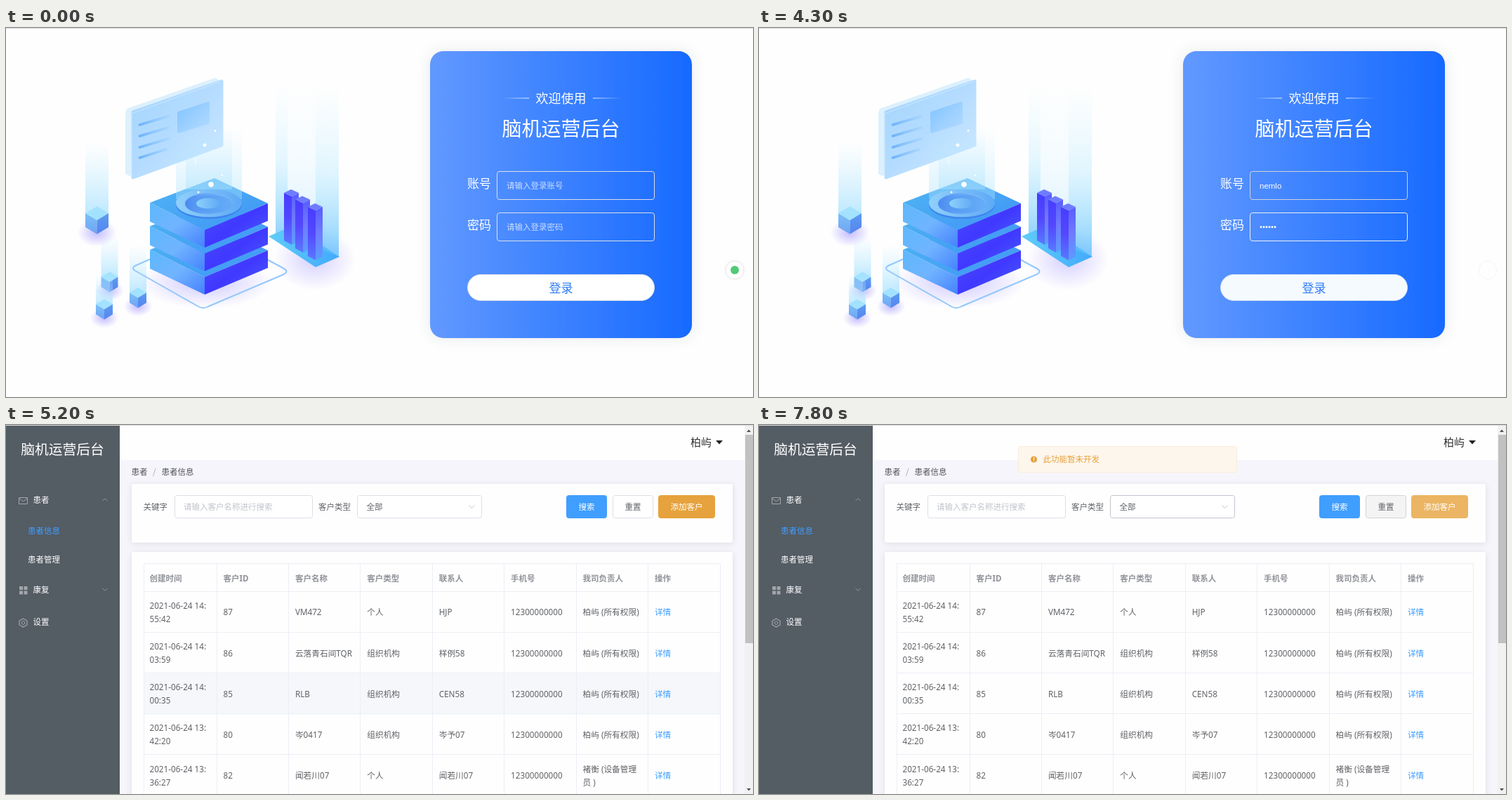
Write an HTML page that moves like this. It is 1064 px wide and 526 px high and loops after 8000 ms.

```html
<!DOCTYPE html>
<html lang="zh">
<head>
<meta charset="utf-8">
<title>后台登录</title>
<style>
  html, body { margin: 0; width: 100%; height: 100%; overflow: hidden; background: #fefefe; }
  svg { display: block; width: 100%; height: 100%; }
  text { font-family: "Noto Sans", "Noto Sans CJK SC", "Noto Sans CJK", sans-serif; white-space: pre; }
  .cjk { font-family: "Noto Sans CJK SC", "Noto Sans CJK", sans-serif; }
  .field { font-family: "Liberation Sans", Arial, sans-serif; }
</style>
</head>
<body>
<svg id="stage" viewBox="0 0 1064 526" xmlns="http://www.w3.org/2000/svg"></svg>
<script>
const LOOP = 8000;
const SIZE = 11.5;
const GREY = '#606266', LINE = '#dcdfe6', HOVER = '#c0c4cc', BLUE = '#409eff', AMBER = '#e6a23c';

// ---------- drawing helpers ----------
const rect = (x, y, w, h, fill, more = '') =>
  `<rect x="${x}" y="${y}" width="${w}" height="${h}" fill="${fill}" ${more}/>`;
const poly = (points, fill, more = '') => `<polygon points="${points}" fill="${fill}" ${more}/>`;
const path = (d, stroke, width = 1, more = '') =>
  `<path d="${d}" fill="none" stroke="${stroke}" stroke-width="${width}" ${more}/>`;
const oval = (x, y, rx, ry, fill, more = '') =>
  `<ellipse cx="${x}" cy="${y}" rx="${rx}" ry="${ry}" fill="${fill}" ${more}/>`;
// y is the middle of the line
const text = (x, y, str, fill = GREY, size = SIZE, more = 'class="cjk"') =>
  `<text x="${x}" y="${(y + size * 0.37).toFixed(2)}" font-size="${size}" fill="${fill}" ${more}>${str}</text>`;
const mid = 'class="cjk" text-anchor="middle"';
const group = (id, body, more = '') => `<g id="${id}" ${more}>${body}</g>`;
const grad = (id, dir, ...stops) => {
  const [x1, y1, x2, y2] = dir;
  const list = stops.map(([c, o = 1], i) =>
    `<stop offset="${i / (stops.length - 1)}" stop-color="${c}" stop-opacity="${o}"/>`).join('');
  return `<linearGradient id="${id}" x1="${x1}" y1="${y1}" x2="${x2}" y2="${y2}">${list}</linearGradient>`;
};
const glow = (id, c, o) => `<radialGradient id="${id}"><stop offset="0" stop-color="${c}" stop-opacity="${o}"/>
  <stop offset="1" stop-color="${c}" stop-opacity="0"/></radialGradient>`;
const shadow = (id, blur, c, o, dy = 0) => `<filter id="${id}" x="-20%" y="-20%" width="140%" height="140%">
  <feDropShadow dx="0" dy="${dy}" stdDeviation="${blur}" flood-color="${c}" flood-opacity="${o}"/></filter>`;

const RIGHT = [0, 0, 1, 0], LEFT = [1, 0, 0, 0], DOWN = [0, 0, 0, 1], SLANT = [0, 0, 1, 1];
const defs = `<defs>
  ${grad('card', RIGHT, ['#6299ff'], ['#3b81ff'], ['#176aff'])}
  ${grad('ruleL', RIGHT, ['#fff', 0], ['#fff', .9])}
  ${grad('ruleR', LEFT, ['#fff', 0], ['#fff', .9])}
  ${grad('beam', DOWN, ['#c4ecff', 0], ['#a9e2ff', .75])}
  ${grad('beamDeep', DOWN, ['#bfefff', 0], ['#a5e4ff', .4], ['#58bdfc', .9])}
  ${grad('screen', SLANT, ['#a3d4fd'], ['#b5dcff'], ['#cfe9ff'])}
  ${grad('tile', SLANT, ['#83c4ff'], ['#b3dbff'])}
  ${grad('row', RIGHT, ['#6cb3fa'], ['#9ed0fd', .6])}
  ${grad('slabTop', SLANT, ['#50b7f2'], ['#3f94f6'])}
  ${grad('slabL', SLANT, ['#5db8fb'], ['#70b4ff'], ['#4581ff'])}
  ${grad('slabR', SLANT, ['#4a4dff'], ['#4038ff'], ['#4a63ff'])}
  ${grad('ring', RIGHT, ['#90d0fb'], ['#5ea9f6'])}
  ${grad('core', RIGHT, ['#4a8af0'], ['#8cc8fb'])}
  ${grad('barL', DOWN, ['#473dff'], ['#5348ff'], ['#5a79ff'])}
  ${grad('barR', DOWN, ['#5a5cff'], ['#6f7bff'], ['#5b9dff'])}
  ${grad('floor', RIGHT, ['#5fcdf8'], ['#42a9fb'])}
  ${grad('cubeL', DOWN, ['#7cc0f8'], ['#6ea3f3'])}
  ${grad('cubeR', DOWN, ['#5c9cf2'], ['#5584ee'])}
  ${glow('violet', '#8a7bff', .5)}
  ${shadow('soft', 9, '#405060', .13)}
  ${shadow('panel', 4, '#000', .1, 1.5)}
  ${shadow('tiny', 2, '#000', .14)}
  <clipPath id="menuClip"><rect id="menuWindow" x="0" y="130" width="162" height="82"/></clipPath>
</defs>`;

// ---------- login illustration ----------
function cube(x, y, w, beamTop) {
  const h = w / 2, q = w * .3, top = y - w * .6, low = y + w * .6;
  return oval(x, low - 2, w * .85, w * .6, 'url(#violet)') +
    rect(x - h, beamTop, w, top + q - beamTop, 'url(#beam)') +
    poly(`${x},${top} ${x + h},${top + q} ${x},${top + 2 * q} ${x - h},${top + q}`, '#a3e2ff') +
    poly(`${x - h},${top + q} ${x},${top + 2 * q} ${x},${low} ${x - h},${low - q}`, 'url(#cubeL)') +
    poly(`${x + h},${top + q} ${x},${top + 2 * q} ${x},${low} ${x + h},${low - q}`, 'url(#cubeR)');
}

function slab(dy) {
  return `<g transform="translate(0 ${dy})">` +
    poly('205,249 297,214 373,250 283,288', 'url(#slabTop)') +
    poly('205,249 283,288 283,313 205,276', 'url(#slabL)') +
    poly('283,288 373,250 373,275 283,313', 'url(#slabR)') + '</g>';
}

function bar(x, top, low) {
  return poly(`${x},${top} ${x + 11},${top + 5} ${x + 11},${low} ${x},${low - 6}`, 'url(#barL)') +
    poly(`${x + 11},${top + 5} ${x + 21},${top} ${x + 21},${low - 5} ${x + 11},${low}`, 'url(#barR)') +
    poly(`${x},${top} ${x + 10},${top - 5} ${x + 21},${top} ${x + 11},${top + 5}`, '#6f7cff');
}

function artwork() {
  const rows = [138, 154, 170, 185].map((y, i) =>
    path(`M190.5 ${y} L${i < 3 ? 231 : 228} ${y - 12}`, 'url(#row)', 3.6, 'stroke-linecap="round"')).join('');
  const sparks = [[292, 223, 3.8], [283, 167, 2.4], [298, 146.5, 1.4], [308, 210, 1.2], [274, 234, 1.5]]
    .map(([x, y, r]) => oval(x, y, r, r, '#fff')).join('');
  return cube(129.5, 274, 33, 163) + cube(147.5, 362, 24, 296) +
    cube(140, 401, 24, 350) + cube(188, 384.5, 24, 308) +
    oval(440, 330, 58, 44, 'url(#violet)', 'opacity=".7"') +
    oval(285, 362, 95, 38, 'url(#violet)', 'opacity=".8"') +
    path('M186 338 L290 292 Q296 290 302 292 L396 343 Q403 347 396 351 L288 397 Q281 401 274 397 L184 346 Q177 342 186 338Z', '#93c8fc', 2) +
    poly('170,121 172,115 298,71 303,74 303,165 176,211 170,208', '#d9effd', 'opacity=".9"') +
    poly('181,120 307,76 307,167 181,213', 'url(#screen)', 'stroke="url(#screen)" stroke-width="5" stroke-linejoin="round"') +
    path('M179 212 L179 122 L306 76', '#d8efff', 1, 'opacity=".7"') +
    rows + poly('246,121 288,107 288,135 246,148', 'url(#tile)', 'stroke="url(#tile)" stroke-width="4" stroke-linejoin="round"') +
    slab(67) + slab(33.5) + slab(0) +
    rect(242, 140, 94, 104, 'url(#beam)', 'opacity=".6"') +
    rect(256, 140, 66, 90, 'url(#beam)', 'opacity=".6"') +
    oval(289, 252, 47, 20, '#3e84ee') + oval(289, 249.5, 47, 20, 'url(#ring)') +
    oval(289, 250.5, 34, 15, 'url(#core)') + oval(295, 251, 28, 13, '#4f9cf6', 'opacity=".6"') +
    oval(288, 250, 17, 7.5, 'url(#ring)') +
    sparks + path('M270 185 V195 M312 157 H320', '#fff', 1) +
    rect(384, 80, 17, 218, 'url(#beamDeep)', 'opacity=".75"') +
    poly('374,297 408,282 475,326 441,341', 'url(#floor)') +
    poly('401,72 441,72 441,312 401,287', 'url(#beamDeep)', 'opacity=".3"') +
    poly('441,82 474,82 474,326 441,312', 'url(#beamDeep)', 'opacity=".85"') +
    bar(396, 235, 309) + bar(412, 244.5, 320) + bar(430, 255, 331);
}

// ---------- login page ----------
function loginPage() {
  const box = (id, y) => rect(699.5, y, 224, 40, 'none', `id="${id}" rx="3.5"`);
  const hint = (id, y, s) => text(713, y, s, '#fff', SIZE, `class="cjk" id="${id}" opacity=".72"`);
  return rect(0, 1, 1064, 525, '#fefefe') + artwork() +
    rect(604, 33, 373, 409, 'url(#card)', 'rx="19" filter="url(#soft)"') +
    rect(706, 99.5, 39, 1, 'url(#ruleL)') + rect(836, 99.5, 41, 1, 'url(#ruleR)') +
    text(790.5, 100.5, '欢迎使用', '#fff', 18, mid) +
    text(790.5, 144, '脑机运营后台', '#fff', 28, mid) +
    text(657, 221.5, '账号', '#fff', 17) + text(657, 280.5, '密码', '#fff', 17) +
    box('userBox', 204.5) + box('passBox', 263.5) +
    hint('userHint', 224.5, '请输入登录账号') + hint('passHint', 283.5, '请输入登录密码') +
    text(713, 224.5, '', '#fff', SIZE, 'class="field" id="userText"') +
    group('dots', '') + rect(0, 0, 1, 13, '#fff', 'id="caret"') +
    rect(657.5, 351.5, 266, 37, '#fff', 'id="enter" rx="18.5"') +
    text(790.5, 370.5, '登录', '#2f7cf6', 17, mid) +
    oval(1038, 345, 12.5, 12.5, '#fefefe', 'stroke="#f5f5f5"') +
    group('badge', oval(1038, 345, 12, 12, '#fff', 'filter="url(#tiny)"') + oval(1038, 345, 6, 6, '#55c878'));
}

// ---------- dashboard ----------
const OWNER = '柏屿 (所有权限)';
const PHONE = '12300000000';
const HEADS = ['创建时间', '客户ID', '客户名称', '客户类型', '联系人', '手机号', '我司负责人', '操作'];
const ROWS = [
  ['14:|55:42', '87', 'VM472', '个人', 'HJP', OWNER],
  ['14:|03:59', '86', '云落青石间TQR', '组织机构', '样例58', OWNER],
  ['14:|00:35', '85', 'RLB', '组织机构', 'CEN58', OWNER],
  ['13:|42:20', '80', '岑0417', '组织机构', '岑予07', OWNER],
  ['13:|36:27', '82', '闻若川07', '个人', '闻若川07', '褚衡 (设备管理|员 )'],
];
const colX = i => i ? 301 + 102.4 * (i - 1) : 196;
const chevron = (x, y, c, r = 4) => path(`M${x - r} ${y - r / 2} L${x} ${y + r / 2} L${x + r} ${y - r / 2}`, c, 1);

function cell(x, y, str, fill) {
  const lines = str.split('|');
  return lines.map((s, i) =>
    text(x, y + (i - (lines.length - 1) / 2) * 19, s, fill, 11.7, '')).join('');
}

function table() {
  let out = HEADS.map((s, i) => text(colX(i) + 8.5, 218.5, s, '#909399', SIZE, 'font-weight="600"')).join('');
  ROWS.forEach(([time, id, name, kind, contact, owner], r) => {
    const y = 238 + 58.2 * r;
    const cells = ['2021-06-24 ' + time, id, name, kind, contact, PHONE, owner, '详情'];
    out += rect(196, y, 822, 58, '#f5f7fa', `id="row${r}" opacity="0"`) +
      cells.map((s, i) => cell(colX(i) + 8.5, y + 29, s, i === 7 ? BLUE : GREY)).join('');
  });
  let d = 'M196.5 197.5 H1017.5 V526 M196.5 197.5 V526';
  for (let i = 1; i < 8; i++) d += ` M${Math.floor(colX(i)) - .5} 198 V526`;
  for (let r = 0; r < 5; r++) d += ` M196 ${Math.floor(238 + 58.2 * r) - .5} H1018`;
  return out + path(d, '#ebeef5');
}

function sidebar() {
  const item = (y, s) => text(38.5, y, s, '#fff', SIZE, 'class="cjk" font-weight="500"');
  const sub = (y, s, c) => text(31, y, s, c, SIZE, 'class="cjk" font-weight="500"');
  const squares = [[19, 150], [25.5, 150], [19, 156.5], [25.5, 156.5]]
    .map(([x, y]) => rect(x, y - 2, 5, 5, '#a2a6ab')).join('');
  return rect(0, 1, 162, 525, '#545c64') +
    text(80.5, 35, '脑机运营后台', '#fff', 19.8, mid) +
    path('M18.5 103.5 H30.5 V112.5 H18.5 Z M18.5 104.5 L24.5 109 L30.5 104.5', '#a2a6ab') +
    item(107, '患者') + group('arrow', chevron(141, 106.5, '#92979c', 3.5)) +
    `<g clip-path="url(#menuClip)">` + sub(151, '患者信息', BLUE) + sub(191.5, '患者管理', '#fff') + '</g>' +
    group('lower', squares + item(153, '康复') + chevron(141, 152.5, '#92979c', 3.5) +
      path('M24.5 194 L30 197 V203 L24.5 206 L19 203 V197 Z', '#a2a6ab', 1.2) +
      oval(24.5, 200, 2.3, 2.3, 'none', 'stroke="#a2a6ab"') + item(199, '设置'));
}

function homePage() {
  const button = (id, x, w, s, fill, ink, edge) =>
    rect(x + .5, 100.5, w - 1, 32, fill, `id="${id}" rx="3" stroke="${edge}"`) +
    text(x + w / 2, 116.5, s, ink, SIZE, mid + ' font-weight="500"');
  const field = (id, x, w) => rect(x + .5, 100.5, w - 1, 32, '#fff', `id="${id}" rx="3" stroke="${LINE}"`);
  return rect(162, 1, 902, 525, '#f5f5fb') + rect(162, 1, 890, 49, '#fefefe') +
    text(975, 24.5, '柏屿', '#303133', 15) + poly('1011,22 1021,22 1016,27.5', '#222') +
    text(178.5, 66.5, '患者', '#505357') + text(209, 66.5, '/', '#a0a4ab') + text(221.5, 66.5, '患者信息', '#505357') +
    rect(179, 84, 856, 83.5, '#fefefe', 'rx="3" filter="url(#panel)"') +
    rect(179, 181, 856, 360, '#fefefe', 'rx="3" filter="url(#panel)"') +
    text(195.5, 116.5, '关键字') + field('key', 240, 197) +
    text(253, 116.5, '请输入客户名称进行搜索', HOVER) +
    text(445, 116.5, '客户类型') + field('pick', 500, 178) + text(513.5, 116.5, '全部') +
    chevron(663.5, 116.5, HOVER) +
    button('find', 798, 58, '搜索', BLUE, '#fff', BLUE) +
    button('reset', 864, 58, '重置', '#fff', GREY, LINE) +
    button('add', 929, 81, '添加客户', AMBER, '#fff', AMBER) +
    table() + sidebar() +
    rect(1052, 1, 12, 525, '#f1f1f1') + rect(1053, 14, 11, 297, '#c1c1c1') +
    poly('1055,10 1061,10 1058,6.5', '#505050') + poly('1055,518 1061,518 1058,521.5', '#505050') +
    group('note', rect(369.5, .5, 311, 37, '#fdf6ec', 'rx="3" stroke="#faecd8"') +
      oval(391.5, 19, 4.6, 4.6, AMBER) + rect(391, 16, 1.1, 3.8, '#fff') + rect(391, 20.6, 1.1, 1.2, '#fff') +
      text(404.5, 19, '此功能暂未开发', AMBER));
}

// ---------- animation ----------
const stage = document.getElementById('stage');
stage.innerHTML = defs + group('login', loginPage()) + group('home', homePage()) +
  rect(0, 0, 1064, 1, '#dcdcdc');

const el = {};
stage.querySelectorAll('[id]').forEach(node => el[node.id] = node);
const set = (id, attrs) => { for (const k in attrs) el[id].setAttribute(k, attrs[k]); };
const show = (id, on) => set(id, { visibility: on ? 'inherit' : 'hidden' });

const ramp = (t, a, b) => Math.min(1, Math.max(0, (t - a) / (b - a)));
const rgb = c => [1, 3, 5].map(i => parseInt(c.slice(i, i + 2), 16));
const mix = (a, b, p) => '#' + rgb(a).map((v, i) =>
  Math.round(v + (rgb(b)[i] - v) * p).toString(16).padStart(2, '0')).join('');
// a colour that passes through [start, end, colour] steps
const fade = (t, first, ...steps) => steps.reduce((c, [a, b, to]) => mix(c, to, ramp(t, a, b)), first);
const count = (t, times) => times.filter(x => t >= x).length;

const USER = 'nemlo';
const USER_KEYS = [1100, 1200, 1800, 1900, 2100];
const PASS_KEYS = [2800, 3100, 3300, 3500, 3600, 3800];
const advance = s => [...s].reduce((w, c) => w + ({ m: .833, l: .222 }[c] || .556) * SIZE, 0);

function drawLogin(t) {
  const typed = USER.slice(0, count(t, USER_KEYS));
  const stars = count(t, PASS_KEYS);
  el.userText.textContent = typed;
  show('userHint', !typed);
  show('passHint', !stars);
  el.dots.innerHTML = Array.from({ length: stars }, (_, i) => oval(715 + 4 * i, 283.7, 1.45, 1.45, '#fff')).join('');

  const inPass = t >= 2400;
  show('caret', t >= 700 && t < 4300 && !(t >= 1700 && t < 1800));
  set('caret', { x: inPass ? 712.5 + 4 * stars : 712.5 + advance(typed), y: inPass ? 277 : 218 });

  set('userBox', { stroke: fade(t, LINE, [100, 300, HOVER], [500, 800, '#ffffff'], [2200, 2500, HOVER], [4200, 4400, LINE]) });
  set('passBox', { stroke: fade(t, LINE, [2200, 2500, '#ffffff'], [4200, 4400, LINE]) });
  set('enter', {
    fill: fade(t, '#ffffff', [4200, 4400, '#ecf5ff']),
    stroke: t >= 4700 ? '#3a8ee6' : fade(t, LINE, [4200, 4400, '#c6e2ff'])
  });
  set('badge', { opacity: 1 - ramp(t, 100, 300) });
}

function drawHome(t) {
  const p = ramp(t, 4850, 5150);
  const open = 82 * (p < .5 ? 4 * p ** 3 : 1 - 4 * (1 - p) ** 3);
  const turn = 180 * (1 - (1 - p) ** 1.6);
  set('menuWindow', { height: open });
  set('lower', { transform: `translate(0 ${open})` });
  set('arrow', { transform: `rotate(${turn} 141 106.5)` });

  set('row2', { opacity: ramp(t, 4880, 5100) - ramp(t, 5350, 5450) });
  set('row0', { opacity: ramp(t, 6450, 6600) - ramp(t, 7050, 7200) });
  set('pick', { stroke: fade(t, LINE, [7050, 7200, HOVER]) });
  set('reset', { fill: fade(t, '#ffffff', [7200, 7400, '#f4f4f5']), stroke: fade(t, LINE, [7200, 7400, '#d3d4d6']) });
  const amber = fade(t, AMBER, [7350, 7500, '#ebb563']);
  set('add', { fill: amber, stroke: amber });

  const drop = ramp(t, 7600, 7800) ** 1.3;
  set('note', { transform: `translate(0 ${-8 + 38 * drop})`, opacity: drop });
}

function draw(t) {
  const inside = t >= 4900;
  show('login', !inside);
  show('home', inside);
  (inside ? drawHome : drawLogin)(t);
}

const start = performance.now();
function tick(now) {
  draw(Math.max(0, now - start) % LOOP);
  requestAnimationFrame(tick);
}
draw(0);
requestAnimationFrame(tick);
</script>
</body>
</html>
```
